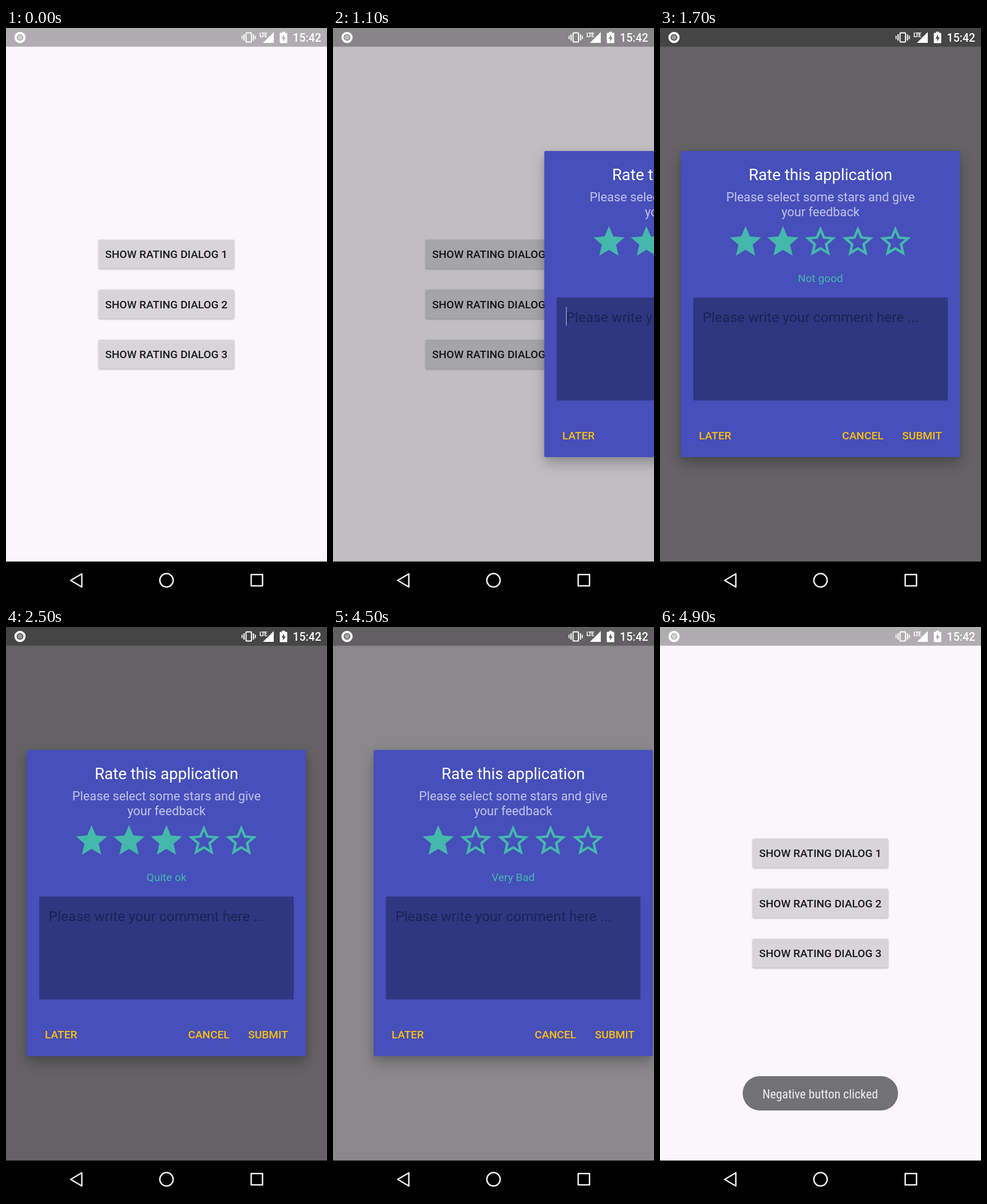
Write an HTML page that moves like this. It is 561x998 px and loops after 5 s.

```html
<!DOCTYPE html>
<html lang="en">
<head>
<meta charset="utf-8">
<title>Rating dialog</title>
<style>
  html, body { margin: 0; width: 100%; height: 100%; overflow: hidden; background: #000; }
  svg { display: block; width: 100%; height: 100%; }
  text { font-family: Roboto, sans-serif; font-size: 19.1px; white-space: pre; }
  .mid { text-anchor: middle; }
  .caps { font-weight: 500; }
  .raised { fill: #d7d5d9; filter: drop-shadow(0 1.5px 1.5px rgba(0,0,0,.32)); }
  .card { fill: #464fba; filter: drop-shadow(0 11px 11px rgba(0,0,0,.24)) drop-shadow(0 1px 4px rgba(0,0,0,.08)); }
  .teal { fill: #45b8ac; }
  .amber { fill: #ffc107; }
  .narrow { font-family: "Roboto Condensed", Roboto, sans-serif; font-stretch: 75%; }
  #toastText { font-size: 21.8px; }
</style>
</head>
<body>
<svg viewBox="0 0 561 998" preserveAspectRatio="none">
  <defs>
    <path id="full" d="M12 17.27L18.18 21l-1.64-7.03L22 9.24l-7.19-.61L12 2 9.19 8.63 2 9.24l5.46 4.73L5.82 21z"/>
    <path id="empty" fill-rule="evenodd" d="M12 17.27L18.18 21l-1.64-7.03L22 9.24l-7.19-.61L12 2 9.19 8.63 2 9.24l5.46 4.73L5.82 21zM12 15.4l-3.76 2.27 1-4.28-3.32-2.88 4.38-.38L12 6.1l1.71 4.04 4.38.38-3.32 2.88 1 4.28z"/>
    <clipPath id="pressArea"><rect x="162" y="370" width="236.5" height="50.5" rx="2"/></clipPath>
  </defs>

  <rect width="561" height="933" fill="#faf7fb"/>
  <rect width="561" height="32.7" fill="#b0adb0"/>
  <g id="buttons"></g>
  <g clip-path="url(#pressArea)"><circle id="ripple" cx="280" cy="395"/></g>
  <rect id="dim" width="561" height="933"/>

  <g id="dialog">
    <rect class="card" x="36.5" y="215" width="488" height="535" rx="2"/>
    <text class="mid" x="280.5" y="266" fill="#fff" style="font-size:27.7px">Rate this application</text>
    <g class="mid" fill="#c2c4e9">
      <text x="280.5" y="303" style="font-size:21.8px">Please select some stars and give</text>
      <text x="280.5" y="328.5" style="font-size:21.8px">your feedback</text>
    </g>
    <g id="stars" class="teal"></g>
    <text id="note" class="mid teal" x="280.5" y="443.5"></text>
    <rect x="58" y="471" width="445" height="180" rx="2" fill="#2f3780"/>
    <text x="74.5" y="514" fill="#1d2257" style="font-size:24.6px">Please write your comment here ...</text>
    <rect id="cursor" x="74.5" y="487.5" width="1.2" height="33" fill="#a9aed6"/>
    <g class="caps amber">
      <text x="68" y="719">LATER</text>
      <text x="318.2" y="719">CANCEL</text>
      <text x="423.3" y="719">SUBMIT</text>
    </g>
  </g>

  <g id="toast">
    <rect x="144.5" y="785" width="271.5" height="60" rx="30" fill="#727173"/>
    <text id="toastText" class="mid narrow" x="280" y="823.5" fill="#f0eef2">Negative button clicked</text>
  </g>

  <!-- status bar icons -->
  <g fill="#fff">
    <circle cx="24.5" cy="16.5" r="7.8" fill="none" stroke="#fff" stroke-width="4"/>
    <circle cx="24.5" cy="16.5" r="4.2" opacity=".45"/>
    <rect x="419.5" y="8.5" width="9.5" height="16" rx="1" fill="none" stroke="#fff" stroke-width="2"/>
    <path d="M415 11h2v11h-2zM411.7 13.5h1.8v6h-1.8zM431.5 11h2v11h-2zM434.8 13.5h1.8v6h-1.8z"/>
    <text class="narrow" x="443" y="15.5" style="font-size:11px;font-weight:700;letter-spacing:-.9px">LTE</text>
    <path d="M468 7v19h-19z"/>
    <path fill-rule="evenodd" d="M482.5 6.5h5v2h3q1 0 1 1v16q0 1-1 1h-11q-1 0-1-1v-16q0-1 1-1h3zM486 11.5l-4.500 7h2.800v5l4.500-7h-2.800z"/>
    <text class="caps" x="551" y="23.5" text-anchor="end" style="font-size:19.6px">15:42</text>
  </g>

  <!-- navigation bar -->
  <rect y="932.5" width="561" height="65.5"/>
  <g fill="none" stroke="#f2f2f2" stroke-width="2.5" stroke-linejoin="round">
    <path d="M132.500 954v23L113 965.500z"/>
    <circle cx="280.5" cy="965.3" r="11.7"/>
    <rect x="428.5" y="955.3" width="19.8" height="19.8"/>
  </g>
</svg>
<script>
const $ = id => document.getElementById(id);
const LOOP = 5000, STEP = 100, TRAVEL = 550, EXIT = 400;

$("buttons").innerHTML = [1, 2, 3].map(n => {
  const y = 282.5 + 87.5 * n;
  return `<rect class="raised" x="162" y="${y}" width="236.5" height="50.5" rx="2"/>
    <text class="mid caps" x="280.2" y="${y + 32}" fill="#1b1a1d">SHOW RATING DIALOG ${n}</text>`;
}).join("");

$("stars").innerHTML = [0, 1, 2, 3, 4].map(i =>
  `<use transform="translate(${116.8 + 65.45 * i} 340.7) scale(2.725)"/>`).join("");
const stars = [...$("stars").children];

// Without a condensed face, a smaller size keeps the toast text inside its pill.
if ($("toastText").getComputedTextLength() > 212) $("toastText").style.fontSize = "19.4px";

// Each row: start time, value
const ripple = [[0, 0], [700, .04], [800, .09], [900, .09], [1000, .04], [1100, 0]];
const entered = [[0, 0], [1000, .02], [1100, .395], [1200, .86], [1300, 1]];
const dimmed = [[0, 0], [1000, .05], [1100, .385], [1200, .8], [1300, 1]];
const rating = [[0, 2], [2400, 3], [3000, 5], [3500, 1]];
const notes = [[0, "Not good"], [2300, "Quite ok"], [2900, "Excellent !!!"], [3400, "Very Bad"]];

const at = (rows, t) => rows.filter(row => row[0] <= t).pop()[1];
const clamp = v => Math.min(1, Math.max(0, v));

function draw(t) {
  const leave = clamp((t - 4400) / EXIT);
  const leaving = t >= 4500;
  const offset = leaving ? leave * leave : 1 - at(entered, t);
  const shade = leaving ? 1 - leave : at(dimmed, t);

  $("ripple").setAttribute("r", 60 + clamp((t - 700) / 300) * 90);
  $("ripple").setAttribute("opacity", at(ripple, t));
  $("dim").setAttribute("opacity", .6 * shade);
  $("dialog").setAttribute("transform", `translate(${offset * TRAVEL} 0)`);
  $("dialog").setAttribute("visibility", offset < 1 ? "visible" : "hidden");
  $("cursor").setAttribute("opacity", Math.floor(t / 500) % 2 ? 0 : 1);
  $("note").textContent = at(notes, t);
  const count = at(rating, t);
  stars.forEach((star, i) => star.setAttribute("href", i < count ? "#full" : "#empty"));
  $("toast").setAttribute("opacity", clamp((t - 4500) / 400));
}

const start = performance.now();
function tick() {
  const t = (performance.now() - start) % LOOP;
  draw(Math.floor(t / STEP) * STEP);
  requestAnimationFrame(tick);
}
tick();
</script>
</body>
</html>
```
